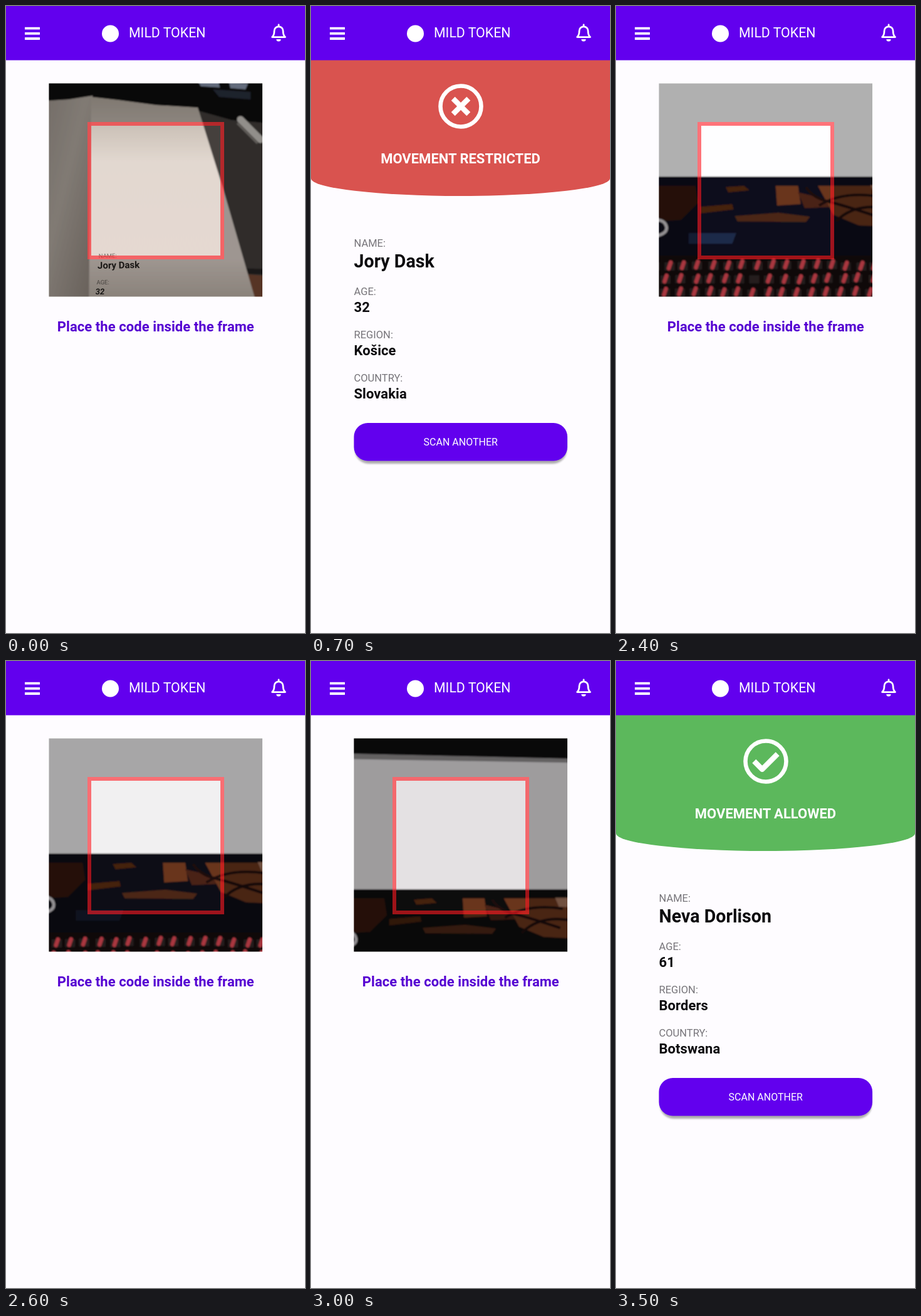
An HTML page that plays this animation: 477 by 1000 pixels, repeating every 7000 ms.

```html
<!DOCTYPE html>
<html lang="en">
<head>
<meta charset="utf-8">
<title>Pass scanner</title>
<style>
html, body { margin: 0; width: 100%; height: 100%; overflow: hidden; background: #fefcff; }
svg { display: block; width: 100vw; height: 100vh; font-family: Roboto, sans-serif; }
.mid { text-anchor: middle; }
.bold { font-weight: 600; }
.label { font-size: 16.5px; fill: #77757a; }
.value { font-size: 22px; font-weight: 600; letter-spacing: .003em; fill: #0c0b0e; }
</style>
</head>
<body>
<svg viewBox="0 0 477 1000">
  <defs>
    <clipPath id="view"><path d="M68.5 123.5h340.5v340h-340.5z"/></clipPath>
    <filter id="soft" x="-10%" y="-10%" width="120%" height="120%"><feGaussianBlur stdDeviation="1.1"/></filter>
    <filter id="shade" x="-10%" y="-20%" width="120%" height="150%"><feGaussianBlur stdDeviation="1.5"/></filter>
    <linearGradient id="desk" x2="1" y2="1">
      <stop stop-color="#a39a92"/><stop offset=".45" stop-color="#bab1a8"/><stop offset="1" stop-color="#93887f"/>
    </linearGradient>
    <linearGradient id="sheet" x2="0" y2="1">
      <stop stop-color="#b9afa4"/><stop offset=".3" stop-color="#e2d8d0"/>
      <stop offset=".75" stop-color="#e5d9d1"/><stop offset="1" stop-color="#bbb0a4"/>
    </linearGradient>
  </defs>
  <rect width="477" height="1000" fill="#fefcff"/>

  <g id="scan">
    <g clip-path="url(#view)">
      <g id="paper">
        <g filter="url(#soft)">
          <path fill="#44413e" d="M50 100h380v390H50z"/>
          <path fill="#0d0a0b" d="M50 100h380v88l-70-6-50-14-175-16-85 4z"/>
          <path fill="#8f9bb4" d="M305 118l34 3 2 9-30-2zM356 122l30 2-4 9-24-2z"/>
          <path fill="#2c3040" d="M330 133l60 4v12l-50-4z"/>
          <path fill="#7d4c36" d="M386 428l50 4v60h-40z"/>
          <path fill="#272422" d="M372 418l60 2v9l-57-2z"/>
          <path fill="url(#desk)" d="M50 152l50-3 38-6v347H50z"/>
          <path fill="url(#sheet)" d="M136 145L180 150 240 158 306 162 346 290 404 490H132z"/>
          <path stroke="#d2cdc7" stroke-width="11" stroke-linecap="round" d="M374 181l32 32"/>
          <path stroke="#8d8883" stroke-width="3" d="M369 187l32 32"/>
        </g>
        <g transform="rotate(-1 147 415)" fill="#262220">
          <text x="148" y="402" font-size="9.5" fill="#777069">NAME:</text>
          <text class="bold" x="146" y="419" font-size="15">Jory Dask</text>
          <text x="144" y="444" font-size="9.5" fill="#68615b">AGE:</text>
          <text class="bold" x="142" y="460" font-size="13" font-style="italic">32</text>
        </g>
      </g>
      <g id="room" filter="url(#soft)"></g>
      <rect id="glare" x="68" y="123" width="342" height="342" fill="#fff"/>
      <path fill="#000" fill-opacity=".31" fill-rule="evenodd" d="M68 123h342v342H68zM130 185v219h218V185z"/>
    </g>
    <rect x="133" y="188" width="212" height="213" fill="none" stroke="#ff1820" stroke-opacity=".6" stroke-width="6"/>
    <text class="bold mid" x="238.8" y="518.5" font-size="22" letter-spacing=".003em" fill="#5500d2">Place the code inside the frame</text>
  </g>

  <g id="result">
    <path id="banner" d="M0 86H477V275A238.5 28 0 0 1 0 275Z"/>
    <g fill="none" stroke="#fff" transform="translate(239 160)">
      <circle r="32.5" stroke-width="6.6"/>
      <path id="mark" stroke-width="8.4" stroke-linejoin="round"/>
    </g>
    <text id="verdict" class="bold mid" x="238.5" y="251" font-size="22" fill="#fff"></text>
    <g id="fields"></g>
    <rect x="70" y="670" width="338" height="60" rx="22" fill="#000" opacity=".32" filter="url(#shade)"/>
    <rect x="68.5" y="665" width="340.5" height="60.5" rx="22" fill="#6200ee"/>
    <text class="mid" x="238.7" y="701" font-size="16" fill="#fff">SCAN ANOTHER</text>
  </g>

  <rect width="477" height="86.5" fill="#6200ee"/>
  <g fill="#fff">
    <path d="M30 33.7h24v3.9H30zM30 41.9h24v3.9H30zM30 50.1h24v3.9H30z"/>
    <circle cx="166.5" cy="44" r="13.5"/>
    <text x="196" y="50" font-size="21.3">MILD TOKEN</text>
    <path d="M431.3 53h7.2a3.6 3.6 0 0 1-7.2 0z"/>
    <path fill="none" stroke="#fff" stroke-width="2.8" stroke-linejoin="round" stroke-linecap="round"
      d="M435 30v2.5M424.6 49.6C427.5 47 428 44 428 39.8a7 7 0 0 1 14 0C442 44 442.5 47 445.4 49.6Z"/>
  </g>
</svg>
<script>
const LOOP = 7000, STEP = 100;
const $ = id => document.getElementById(id);
const show = (id, on) => $(id).setAttribute('display', on ? 'inline' : 'none');
const clamp = v => Math.min(1, Math.max(0, v));

// Piecewise linear value through [time, value] points
function track(points, t) {
  let [t0, v0] = points[0];
  for (const [t1, v1] of points) {
    if (t < t1) return v0 + (v1 - v0) * clamp((t - t0) / (t1 - t0));
    [t0, v0] = [t1, v1];
  }
  return v0;
}

function random(seed) {
  return () => (seed = seed * 16807 % 2147483647) / 2147483647;
}

// Monitor, table and keyboard; y = 0 is the lower edge of the screen
function buildRoom() {
  const rnd = random(41);
  const shape = (d, fill) => `<path d="${d}" fill="${fill}"/>`;
  let out = shape('M0-400H480V420H0z', '#100b0b')
    + shape('M0-213L480-202V0H0z', '#8f8c8d')
    + '<path id="screen" d="M0-204L480-196V0H0z"/>'
    + '<path id="table" d="M0 0H480V126H0z"/>'
    + shape('M40 14L132 14 136 40 110 66 40 70z', '#35190f')
    + shape('M140 46l48-4 2 8-50 6z', '#45210f')
    + shape('M178 16l28-2 8 7-32 3z', '#45210f')
    + shape('M254 14h34l4 28-36 2z', '#69341f')
    + shape('M288 24l34 8 22 14-46 2z', '#4a2314')
    + shape('M318 14H460V78l-80-4-38-16z', '#69341f')
    + shape('M192 60l66-5 48 6-6 8-104-1z', '#4c2615')
    + shape('M398 13h60v16l-54-2z', '#a3745d')
    + '<path d="M300 16q10 16 34 22t72 22M320 44q34-22 90-14M346 68q26-28 76-20" fill="none" stroke="#1c0e0a" stroke-width="4"/>'
    + '<path id="glow" d="M122 86h72l-6 16h-66z" fill="#1f2a48"/>'
    + '<path d="M58 67q27-5 30 9t-30 16" fill="none" stroke="#d4d0d4" stroke-width="4.5"/>'
    + shape('M0 120H480V420H0z', '#17100f');
  let caps = '', lights = '';
  for (let row = 0; row < 9; row++) {
    for (let col = 0; col < 18; col++) {
      const x = 44 + col * 22.4 - row * 3 + rnd() * 4;
      const y = 128 + row * 20.5 + rnd() * 3;
      caps += `M${x - 7} ${y}h15v12h-15z`;
      if (rnd() < .88) lights += `M${x + 2} ${y}l-3 9`;
    }
  }
  return out + shape(caps, '#362a29')
    + `<path d="${lights}" stroke="#f5505c" stroke-width="6" stroke-linecap="round"/>`;
}

const LABELS = ['NAME:', 'AGE:', 'REGION:', 'COUNTRY:'];
const ROWS = [[384, 417], [461, 487.5], [529.5, 556.5], [598.5, 625.5]];
const RESTRICTED = {
  color: '#d9534f', title: 'MOVEMENT RESTRICTED', mark: 'M-12.3-12.3L12.3 12.3M12.3-12.3L-12.3 12.3',
  values: ['Jory Dask', '32', 'Košice', 'Slovakia']
};
const ALLOWED = {
  color: '#5cb85c', title: 'MOVEMENT ALLOWED', mark: 'M-18.7-.3L-5.8 12.8 18.7-11.7',
  values: ['Neva Dorlison', '61', 'Borders', 'Botswana']
};

let shown;
function setResult(r) {
  if (r === shown) return;
  shown = r;
  $('banner').setAttribute('fill', r.color);
  $('mark').setAttribute('d', r.mark);
  $('verdict').textContent = r.title;
  $('fields').innerHTML = ROWS.map(([top, base], i) =>
    `<text class="label" x="68.5" y="${top}">${LABELS[i]}</text>` +
    `<text class="value" x="68.5" y="${base}"${i ? '' : ' style="font-size:28.6px;letter-spacing:0"'}>${r.values[i]}</text>`
  ).join('');
}

function draw(time) {
  const t = Math.floor(time % LOOP / STEP) * STEP;
  const first = t < 700, second = t >= 1900 && t < 3500;
  show('scan', first || second);
  show('result', !first && !second);
  if (!first && !second) return setResult(t < 1900 ? RESTRICTED : ALLOWED);

  show('paper', first);
  show('room', second);
  show('glare', second && t < 2100);
  if (first) {
    const k = t / 600;
    $('paper').setAttribute('transform', `translate(${-2 * k} ${-5 * k})`);
    return;
  }
  const edge = track([[1900, 190], [2400, 272], [2800, 342], [3200, 386.5], [3400, 390]], t);
  const shift = track([[2400, 0], [2800, -9], [3200, -16]], t);
  const zoom = track([[2800, 1.05], [3200, 1]], t);
  const dim = clamp((t - 2400) / 400);
  const mix = (a, b) => Math.round(a + (b - a) * dim);
  $('room').setAttribute('transform', `translate(${239 + shift} ${edge}) scale(${zoom}) translate(-239 0)`);
  $('screen').setAttribute('fill', `rgb(${mix(254, 228)},${mix(254, 225)},${mix(255, 227)})`);
  $('table').setAttribute('fill', `rgb(${mix(15, 17)},${mix(15, 12)},${mix(30, 13)})`);
  $('glow').setAttribute('opacity', 1 - dim);
  $('glare').setAttribute('opacity', t < 2000 ? 1 : .3);
}

$('room').innerHTML = buildRoom();
const start = performance.now();
function tick() {
  draw(performance.now() - start);
  requestAnimationFrame(tick);
}
tick();
</script>
</body>
</html>
```
